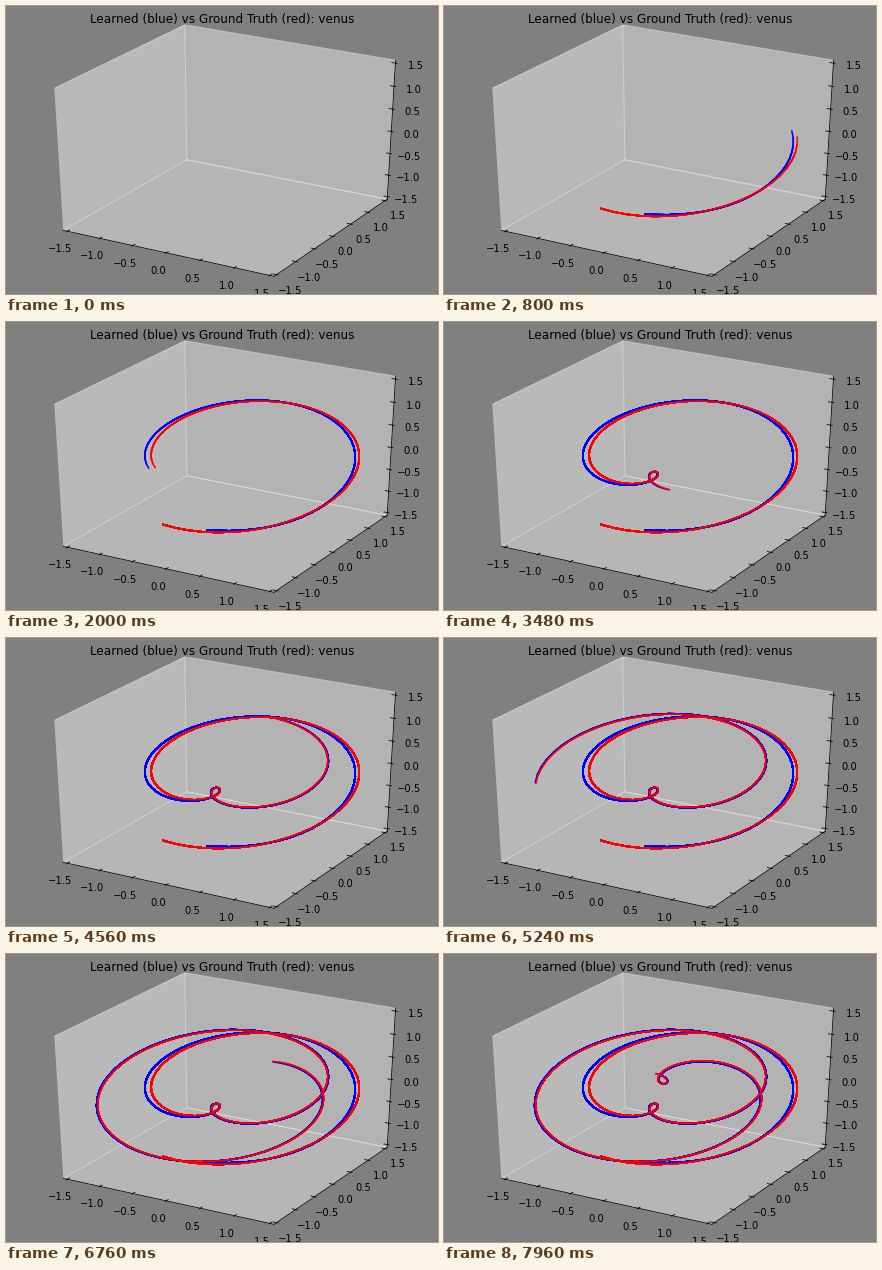
Write a matplotlib script that moves like this. It is 432 by 288 pixels and loops after 8000 ms.

```python
import numpy as np
import matplotlib.pyplot as plt
from matplotlib.animation import FuncAnimation
from matplotlib.collections import LineCollection
from matplotlib.patches import Polygon

W, H, DPI = 432, 288, 72
FRAMES, STEP = 200, 40
OVERLAY = 80          # how many past trails stay stacked on each other
LIM = 1.5
EDGE = LIM * 25 / 24  # panes reach a little past the limits
DELTA = 2 * LIM / 12
LABEL_GAP = 11.5 * 48 / 720 * DELTA

plt.rcParams["font.family"] = "DejaVu Sans"


def project(p):
    """Perspective view (elev 30, azim -60) to stage pixels, y upwards."""
    p = np.asarray(p, float) / (2 * LIM)
    el, az = np.radians(30), np.radians(-60)
    eye = np.array([np.cos(az) * np.cos(el), np.sin(az) * np.cos(el), np.sin(el)])
    right = np.array([-np.sin(az), np.cos(az), 0])
    up = np.cross(eye, right)
    depth = 10 - p @ eye
    xy = np.stack([p @ right / depth, p @ up / depth], axis=-1)
    return (xy + 0.095) / 0.185 * [W, H]


def to_equatorial(plane, z):
    """Ecliptic complex position plus height to x, y, z."""
    tilt = np.radians(23.44)
    x, y = plane.real, plane.imag
    return np.stack([x, y * np.cos(tilt) - z * np.sin(tilt),
                     y * np.sin(tilt) + z * np.cos(tilt)], axis=-1)


def bump(k, mid, width):
    return np.exp(-((k - mid) / width) ** 2)


def orbits():
    k = np.arange(FRAMES)
    days = 5.0 * k
    anomaly = np.radians(0.9856 * days)
    sun_lon = np.radians(283.3 + 1.915 * np.sin(anomaly)) + anomaly
    planet_lon = np.radians(245.4 + 1.60213 * days)
    truth = ((1 - 0.0167 * np.cos(anomaly)) * np.exp(1j * sun_lon)
             + 0.7233 * np.exp(1j * planet_lon))
    z = 0.0428 * np.sin(planet_lon - np.radians(76.7))

    # the learned path starts ahead, then settles on the true one
    lead = np.radians(22.5 * np.exp(-k / 16) - 1.2)
    size = (1 + 0.02 * bump(k, 7, 5) - 0.035 * bump(k, 19, 8)
            + 0.09 * bump(k, 50, 13) + 0.008 * bump(k, 128, 15)
            - 0.012 * bump(k, 172, 14))
    learned = truth * size * np.exp(1j * lead)
    return project(to_equatorial(learned, z)), project(to_equatorial(truth, z))


def line(a, b):
    (x0, y0), (x1, y1) = project([a, b])
    ax.plot([x0, x1], [y0, y1], color="black", lw=0.8)


def draw_axis(index, start, end, tick_dir, tick_sign):
    line(start, end)
    for loc in np.arange(-LIM, LIM + 0.1, 0.5):
        pos = np.array(start, float)
        pos[index] = loc
        inner, outer = pos.copy(), pos.copy()
        inner[tick_dir] += 0.2 * tick_sign * DELTA
        outer[tick_dir] -= 0.1 * tick_sign * DELTA
        line(inner, outer)
        gap = np.sign(pos) * LABEL_GAP
        gap[index] = 0
        x, y = project(pos + gap)
        label = f"{loc:.1f}".replace("-", "\u2212")
        ax.text(x, y, label, size=10, ha="center", va="top")


fig = plt.figure(figsize=(W / DPI, H / DPI), dpi=DPI, facecolor="gray")
ax = fig.add_axes([0, 0, 1, 1])
ax.set(xlim=(0, W), ylim=(0, H))
ax.axis("off")

lo, hi = -EDGE, EDGE
panes = [
    (0.95, [(lo, lo, lo), (lo, hi, lo), (lo, hi, hi), (lo, lo, hi)]),
    (0.90, [(lo, hi, lo), (hi, hi, lo), (hi, hi, hi), (lo, hi, hi)]),
    (0.925, [(lo, lo, lo), (hi, lo, lo), (hi, hi, lo), (lo, hi, lo)]),
]
for shade, corners in panes:
    ax.add_patch(Polygon(project(corners), closed=False, lw=1,
                         color=(shade,) * 3, alpha=0.5))

draw_axis(0, (lo, lo, lo), (hi, lo, lo), 1, 1)
draw_axis(1, (hi, hi, lo), (hi, lo, lo), 0, -1)
draw_axis(2, (hi, hi, lo), (hi, hi, hi), 0, -1)

ax.text(W / 2, 0.92 * H + 6, "Learned (blue) vs Ground Truth (red): venus",
        size=12, ha="center", va="baseline")

learned, truth = orbits()
trails = LineCollection([], colors=["blue", "red"], linewidths=1.5,
                        capstyle="projecting", joinstyle="round", zorder=5)
ax.add_collection(trails, autolim=False)


def update(frame):
    first = max(2, frame - OVERLAY + 1)
    trails.set_segments([path[:n] for n in range(first, frame + 1)
                         for path in (learned, truth)])
    return [trails]


anim = FuncAnimation(fig, update, frames=FRAMES, interval=STEP,
                     init_func=lambda: update(0), repeat=True, repeat_delay=0)
plt.show()
```
